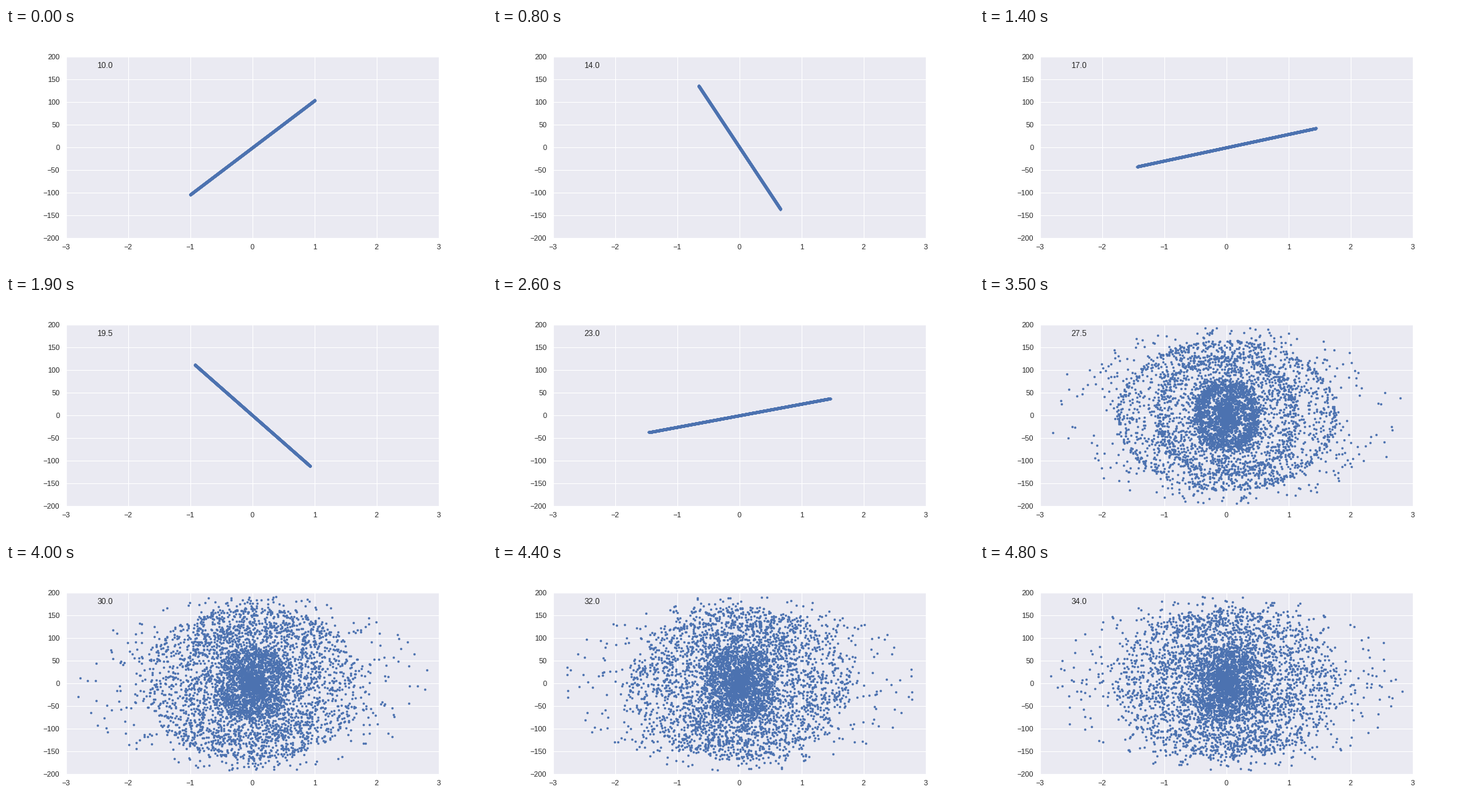
A matplotlib script that plays this animation: 720 by 360 pixels, repeating every 4900 ms.

```python
import numpy as np
import matplotlib.pyplot as plt
from matplotlib.animation import FuncAnimation

FRAMES, STEP = 49, 100
BREAK = 30          # last step with the particles in line
PAIRS = 2500

plt.rcParams.update({
    "font.family": "Liberation Sans",
    "font.size": 12,
    "text.color": ".15",
    "xtick.color": ".15",
    "ytick.color": ".15",
})

rng = np.random.default_rng(7)
rank = np.linspace(0, 1, PAIRS)
cloud_r = np.interp(rank, [0, .2, .45, .72, .945, .975, 1],
                    [0, .25, .6, 1.2, 1.8, 2.2, 2.85])
offset = rng.uniform(-np.pi / 2, np.pi / 2, PAIRS)
drift = rng.normal(0, 1, PAIRS)


def speed(r):
    """Largest velocity on an orbit of radius r."""
    return 215 * (1 - np.exp(-r / 1.2))


rate = np.radians(15.2) * speed(cloud_r + .01) / (108 * (cloud_r + .01))


def bar_angle(n):
    psi = np.radians(52.3 - 15.2 * n)
    theta = psi
    for _ in range(30):
        theta = psi - .145 * np.sin(2 * theta)
    return theta


def bar_tip(n):
    theta = bar_angle(n)
    c, s = np.cos(theta), np.sin(theta)
    p = 1.47
    r = (abs(c) ** p + abs(s) ** p) ** (-1 / p)
    return 1.58 * r * c, 170 * r * s


def cloud(n, mix):
    age = n - BREAK
    band = .055 * np.exp(-max(age - 5, 0) / 4) * np.minimum(1, cloud_r / .3)
    r = cloud_r - band * np.sin(2 * np.pi * (cloud_r - .45) / .65)
    r = np.abs(r * (1 + .004 * max(age - 5, 0) * drift * (cloud_r < 2.2)))
    theta = bar_angle(BREAK) - rate * age + mix * offset
    return r * np.cos(theta), speed(r) * np.sin(theta)


def state(n):
    tx, tv = bar_tip(n)
    x, v = rank * tx, rank * tv
    mix = np.clip((n - BREAK) / 3, 0, 1)
    if mix > 0:
        cx, cv = cloud(n, mix)
        x, v = x + mix * (cx - x), v + mix * (cv - v)
    return np.r_[x, -x], np.r_[v, -v]


fig = plt.figure(figsize=(10, 5), dpi=72, facecolor="white")
ax = fig.add_axes([.125, .125, .775, .755], facecolor="#EAEAF2")
ax.set(xlim=(-3, 3), ylim=(-200, 200))
ax.set_axisbelow(True)
ax.grid(color="white", linewidth=1)
ax.tick_params(length=6, pad=3.5, labelsize=11, bottom=False, left=False)
for spine in ax.spines.values():
    spine.set(color="white", linewidth=1.25)

dots, = ax.plot([], [], ".", color="#4C72B0", markersize=5)
label = ax.text(-2.5, 175, "")


def update(n):
    dots.set_data(*state(n))
    label.set_text(f"{10 + n / 2:.1f}")
    return dots, label


anim = FuncAnimation(fig, update, frames=FRAMES, interval=STEP,
                     repeat=True, repeat_delay=0)
plt.show()
```
